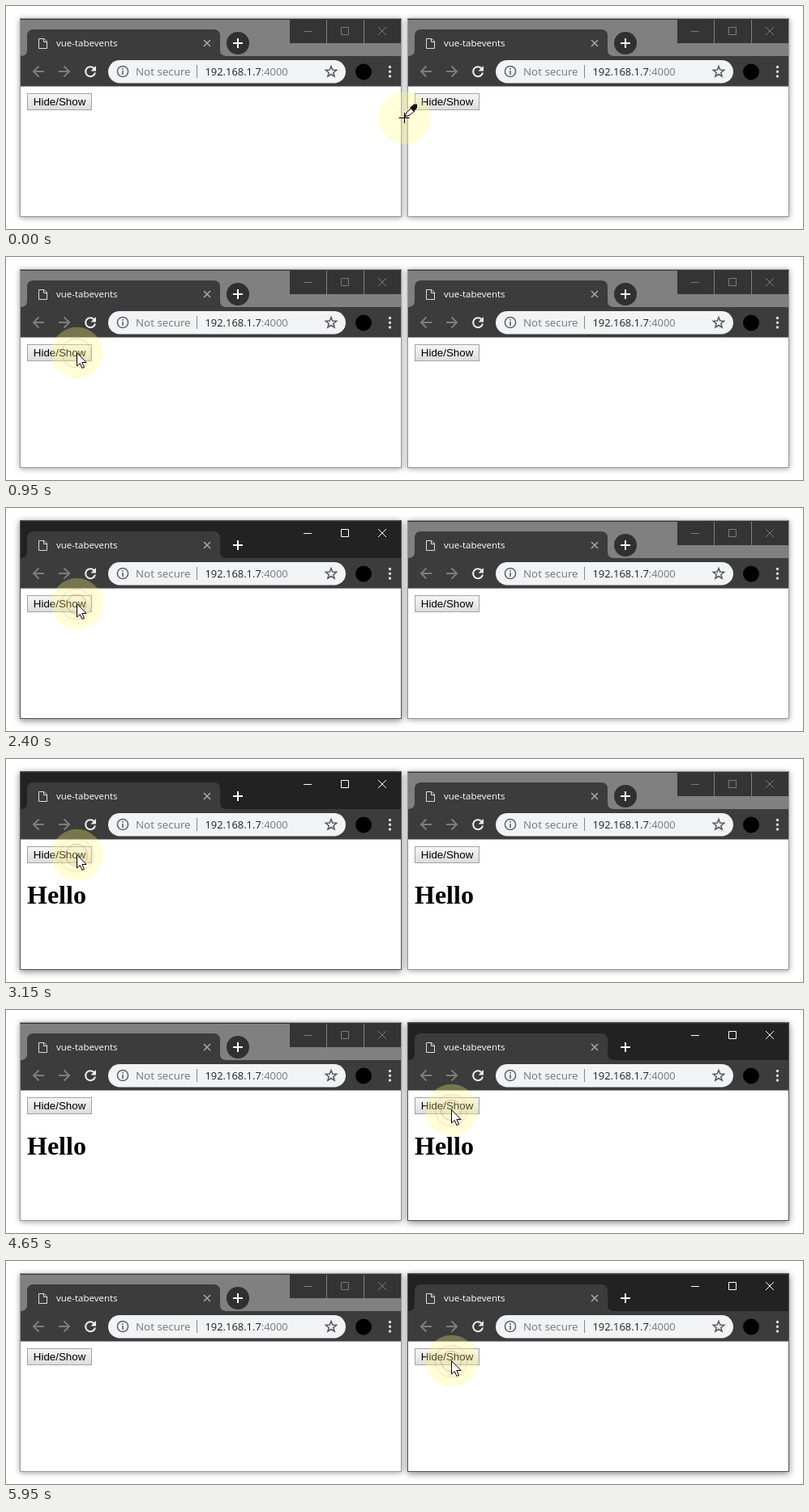
Animation of 983 by 276 pixels, one loop 6000 ms. Source, as an HTML page:

```html
<!DOCTYPE html>
<html lang="en">
<head>
<meta charset="utf-8">
<title>Tab events</title>
<style>
html, body { margin: 0; width: 100%; height: 100%; overflow: hidden; background: #fff }
svg { display: block }
text { white-space: pre }
.ui { font-family: "Open Sans", "Noto Sans", sans-serif }
.button { font: 13.33px "Liberation Sans", Arial, sans-serif }
.hello { font: bold 32px "Liberation Serif", "Times New Roman", serif }
.line { fill: none }
.frame { fill: #fff; stroke: #999; filter: drop-shadow(0 1px 3.5px rgba(0,0,0,.4)) }
.bar { fill: #808080 }
.caption { fill: #343434 }
.split { stroke: #808080 }
.controls { fill: none; stroke: #7c7c7c }
.disc { fill: #303030 }
.active .frame { stroke: #555; filter: drop-shadow(0 2px 4.5px rgba(0,0,0,.5)) }
.active .bar { fill: #222 }
.active .caption, .active .split, .active .disc { display: none }
.active .controls { stroke: #fff }
</style>
</head>
<body>
<svg width="983" height="276" viewBox="0 0 983 276">
  <defs>
    <linearGradient id="face" x2="0" y2="1">
      <stop stop-color="#f6f6f6"/><stop offset="1" stop-color="#dcdcdc"/>
    </linearGradient>
  </defs>
  <g id="desk"></g>
  <circle id="halo" r="32" fill="#fffa78" opacity=".3"/>
  <g id="rings" fill="none" stroke="#e86060"></g>
  <path id="arrow" d="M0 0V16.5L3.8 13L6.4 19L9 17.9L6.4 12H11.6Z" fill="#fff" stroke="#000"/>
  <g id="pen">
    <path d="M-6.5 .5H6.5M.5 -6V7" stroke="#000"/>
    <path d="M1 -1L3 -6L9 -12L13 -8L7 -3Z" fill="#fff" stroke="#000"/>
    <path d="M7 -12L12 -16.5H16V-12L12 -7Z" fill="#111"/>
  </g>
</svg>
<script>
const LOOP = 6000, STEP = 50;
const $ = id => document.getElementById(id);

const star = Array.from({ length: 10 }, (_, i) => {
  const a = i * Math.PI / 5 - Math.PI / 2, r = i % 2 ? 3 : 7;
  return `${401 + r * Math.cos(a)},${81.5 + r * Math.sin(a)}`;
}).join(' ');

const windowArt = `
  <rect class="frame" x="17.5" y="15.5" width="470" height="245"/>
  <path class="bar" d="M18 16H487V63H18Z"/>
  <path d="M17.5 16.5H487.5" stroke="#333"/>
  <path class="caption" d="M350 17H487V46H350Z"/>
  <path class="split" d="M395.5 17V46M441.5 17V46"/>
  <path class="controls" d="M367 31.5H377M413.5 26.5H422.5V35.5H413.5ZM459 26L469 36M469 26L459 36"/>
  <path d="M18 62Q26 62 26 54V37Q26 29 34 29H256Q264 29 264 37V54Q264 62 272 62H487V99.5H18Z" fill="#3c3c3c"/>
  <path class="line" d="M40.5 40.5H47L50.5 44V52.5H40.5ZM46.5 40.5V44.5H50.5" stroke="#ddd"/>
  <text class="ui" x="62" y="50" font-size="11.5" fill="#fff">vue-tabevents</text>
  <path d="M244 42L252 50M252 42L244 50" stroke="#aaa" stroke-width="1.5"/>
  <circle class="disc" cx="286" cy="46" r="14"/>
  <path d="M280 46H292M286 40V52" stroke="#fff" stroke-width="2"/>
  <path class="line" d="M47 81H34.5M40.5 74.5L34 81L40.5 87.5M65 81H77.5M71.5 74.5L78 81L71.5 87.5" stroke="#7d7d7d" stroke-width="2"/>
  <path class="line" d="M108.5 77A6 6 0 1 0 110 82.5" stroke="#eee" stroke-width="2"/>
  <path d="M111 74V80.5H104.5Z" fill="#eee"/>
  <rect x="126" y="67" width="293" height="28.5" rx="14.2" fill="#f1f3f4"/>
  <circle class="line" cx="144" cy="81" r="6.6" stroke="#5f6368" stroke-width="1.5"/>
  <path d="M144 77V78.7M144 80V85" stroke="#5f6368" stroke-width="1.6"/>
  <text class="ui" x="160" y="86" font-size="13.4" fill="#73777b">Not secure</text>
  <path d="M235.5 73V89" stroke="#888"/>
  <text class="ui" x="245.5" y="86" font-size="12.9" fill="#202124">192.168.1.7<tspan fill="#777b80">:4000</tspan></text>
  <polygon class="line" points="${star}" stroke="#55595d" stroke-width="1.5"/>
  <circle cx="441" cy="81.5" r="10" fill="#000"/>
  <path d="M473.5 75.5v0M473.5 81.2v0M473.5 87v0" stroke="#ddd" stroke-width="3.4" stroke-linecap="round"/>
  <rect x="26.5" y="108.5" width="79" height="20" fill="url(#face)" stroke="#a3a3a3"/>
  <text class="button" x="33.8" y="123">Hide/Show</text>
  <text class="hello" x="26" y="179">Hello</text>`;

$('desk').innerHTML = [0, 478].map(x => `<g transform="translate(${x})">${windowArt}</g>`).join('');
const [left, right] = $('desk').children;
const hellos = document.querySelectorAll('.hello');

// Pointer stops: time, x, y
const path = [[0, 491, 138], [50, 491, 138], [620, 87, 118], [3450, 87, 118],
  [3600, 545, 132], [3950, 545, 132], [4250, 549, 123], [LOOP, 549, 123]];
const toggles = [1600, 2330, 3050, 4700, 5300, 5850];
const clicks = [650, 1350, 2080, 2800, 3480, 3570, 4320, 5050, 5620];
const single = [650, 3480, 3570];
const rings = clicks.flatMap(t => single.includes(t) ? [t] : [t, t + 140]);

function pointer(t) {
  const i = path.findIndex(p => p[0] > t);
  const [t0, x0, y0] = path[i - 1], [t1, x1, y1] = path[i];
  const p = (t - t0) / (t1 - t0), e = p * p * (3 - 2 * p);
  return [x0 + (x1 - x0) * e, y0 + (y1 - y0) * e];
}

function ring(start, t) {
  const p = (t - start) / 400;
  if (p < 0 || p >= 1) return '';
  const x = start < 3500 ? 87 : start < 4000 ? 546 : 549;
  const y = start < 3500 ? 119 : start < 4000 ? 133 : 124;
  return `<circle cx="${x}" cy="${y}" r="${3 + 20 * p}" opacity="${.75 * (1 - p) + .1}"/>`;
}

function activate(win) {
  for (const w of [left, right]) w.classList.toggle('active', w === win);
  if (win && win.nextSibling) $('desk').append(win);
}

function draw(now) {
  const t = Math.floor(now % LOOP / STEP) * STEP;
  const [x, y] = pointer(t);
  activate(t < 1000 ? null : t < 3600 ? left : right);
  const shown = toggles.filter(s => s <= t).length % 2;
  hellos.forEach(h => h.style.display = shown ? '' : 'none');

  const place = (id, dx, dy) => $(id).setAttribute('transform', `translate(${x + dx} ${y + dy})`);
  place('halo', .5, .8);
  place('arrow', .5, .5);
  place('pen', 0, 0);
  $('pen').style.display = t < 50 ? '' : 'none';
  $('arrow').style.display = t < 50 ? 'none' : '';
  $('rings').innerHTML = rings.map(s => ring(s, t)).join('');
  requestAnimationFrame(draw);
}

let origin;
requestAnimationFrame(function begin(now) {
  origin = now;
  draw(0);
});
const baseDraw = draw;
draw = now => baseDraw(now && now - origin);
</script>
</body>
</html>
```
